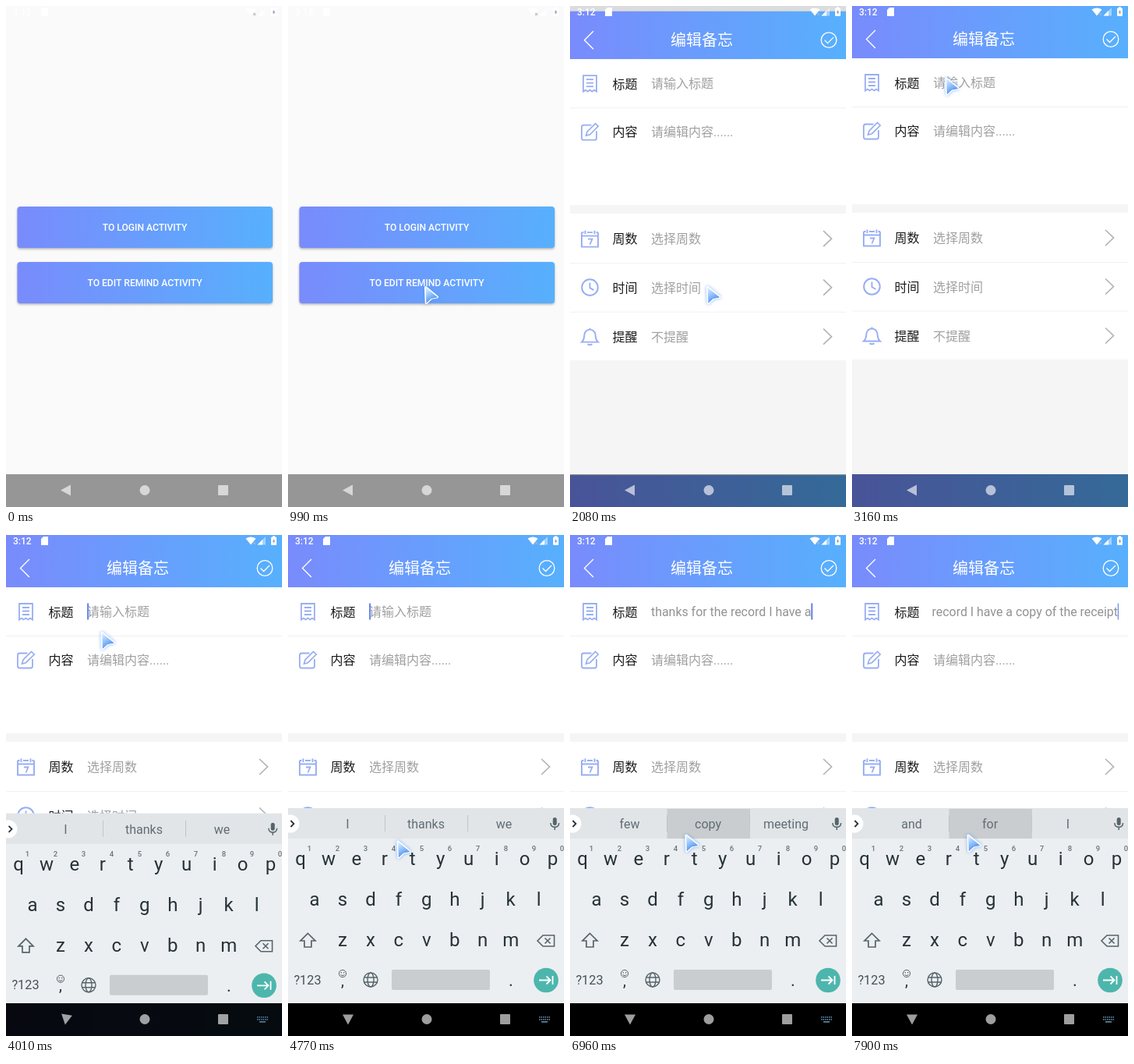
These frames come from a looping animation (354x642 px, 8000 ms). An HTML page with a canvas:

```html
<!DOCTYPE html>
<html lang="zh-CN">
<head>
<meta charset="utf-8">
<title>Edit memo</title>
<style>
html, body { margin: 0; width: 100%; height: 100%; overflow: hidden; background: #fafafa; }
canvas { display: block; width: 354px; height: 642px; }
</style>
</head>
<body>
<canvas id="stage"></canvas>
<script>
const W = 354, H = 642, LOOP = 8000, NAV = 600;
const FONT = "Roboto, 'Noto Sans CJK SC', 'Noto Sans CJK', sans-serif";
const cv = document.getElementById('stage');
const c = cv.getContext('2d');
const dpr = window.devicePixelRatio || 1;
cv.width = W * dpr;
cv.height = H * dpr;

// ---- helpers ----
const clamp = x => Math.max(0, Math.min(1, x));
const span = (t, a, b) => clamp((t - a) / (b - a));
const mix = (a, b, k) => a + (b - a) * k;

// y at x on a cubic through (x0,y0)..(x3,y3)
function cubic(x, x0, y0, x1, y1, x2, y2, x3, y3) {
  const at = (u, a, b, d, e) => {
    const v = 1 - u;
    return v * v * v * a + 3 * v * v * u * b + 3 * v * u * u * d + u * u * u * e;
  };
  let lo = 0, hi = 1;
  for (let i = 0; i < 24; i++) {
    const m = (lo + hi) / 2;
    if (at(m, x0, x1, x2, x3) < x) lo = m; else hi = m;
  }
  return at(lo, y0, y1, y2, y3);
}
const slowIn = x => cubic(x, 0, 0, .4, 0, .2, 1, 1, 1);
const extraSlowIn = x => x < 1 / 6
  ? cubic(x, 0, 0, .05, 0, .1333, .06, 1 / 6, .4)
  : cubic(x, 1 / 6, .4, .2083, .82, .25, 1, 1, 1);

function rect(x, y, w, h, fill) {
  c.fillStyle = fill;
  c.fillRect(x, y, w, h);
}
function round(x, y, w, h, r, fill) {
  c.beginPath();
  c.roundRect(x, y, w, h, r);
  c.fillStyle = fill;
  c.fill();
}
function disc(x, y, r, fill) {
  c.beginPath();
  c.arc(x, y, r, 0, 7);
  c.fillStyle = fill;
  c.fill();
}
function poly(pts, close) {
  c.beginPath();
  for (let i = 0; i < pts.length; i += 2) c.lineTo(pts[i], pts[i + 1]);
  if (close) c.closePath();
}
function fillPoly(pts, fill) {
  poly(pts, true);
  c.fillStyle = fill;
  c.fill();
}
function line(pts, color, w, close) {
  poly(pts, close);
  c.strokeStyle = color;
  c.lineWidth = w;
  c.stroke();
}
function path(d, color, w, x = 0, y = 0) {
  c.save();
  c.translate(x, y);
  c.strokeStyle = color;
  c.lineWidth = w;
  c.stroke(new Path2D(d));
  c.restore();
}
function text(s, x, y, size, color, align = 'left', weight = 400) {
  c.font = `${weight} ${size}px ${FONT}`;
  c.textAlign = align;
  c.fillStyle = color;
  c.fillText(s, x, y);
}
function blueFade(x0, x1) {
  const g = c.createLinearGradient(x0, 0, x1, 0);
  g.addColorStop(0, '#798bfc');
  g.addColorStop(1, '#57b0fd');
  return g;
}

// ---- system bars ----
function statusBar() {
  const w = '#fff';
  text('3:12', 9, 12, 12, w, 'left', 500);
  fillPoly([48, 2, 54, 2, 54, 13, 45, 13, 45, 5], w);
  c.beginPath();
  c.moveTo(314, 12.5);
  c.lineTo(307.5, 4.5);
  c.quadraticCurveTo(314, .5, 320.5, 4.5);
  c.closePath();
  c.fillStyle = w;
  c.fill();
  text('×', 316.5, 13, 8, '#a8b4c8', 'left', 700);
  c.globalAlpha = .45;
  fillPoly([333, 2, 333, 12.5, 322.5, 12.5], w);
  c.globalAlpha = 1;
  fillPoly([329, 6, 329, 12.5, 322.5, 12.5], w);
  round(340, 2.5, 7, 10.5, 1, w);
  rect(342, 1.3, 3, 2, w);
  fillPoly([344.2, 4.5, 341.6, 8.4, 343.3, 8.4, 342.8, 11.2, 345.4, 7.2, 343.7, 7.2], '#8b9bb8');
}

function navBar(kb) {
  rect(0, NAV, W, H - NAV, 'rgba(0,0,0,.4)');
  c.globalAlpha = kb;
  rect(0, NAV, W, H - NAV, '#000');
  c.globalAlpha = 1;
  const ink = 'rgba(255,255,255,.62)';
  c.save();
  c.translate(77, 620.5);
  c.rotate(-Math.PI / 2 * kb);
  fillPoly([-7, 0, 6, -7, 6, 7], ink);
  c.restore();
  disc(178, 620.5, 6.5, ink);
  round(272, 614, 13, 13, 1, ink);
  if (kb > 0) {
    c.globalAlpha = kb;
    for (let r = 0; r < 2; r++)
      for (let i = 0; i < 6; i++) rect(322 + i * 2.5, 617 + r * 3, 1.5, 1.7, '#5f87a0');
    rect(325, 623, 8, 1.7, '#5f87a0');
    c.globalAlpha = 1;
  }
}

// ---- first screen ----
function button(y, label, press) {
  c.save();
  c.shadowColor = 'rgba(0,0,0,.3)';
  c.shadowBlur = (3 + press * 3) * dpr;
  c.shadowOffsetY = (1.5 + press) * dpr;
  round(14.5, y, 327.5, 53, 4, blueFade(14, 342));
  c.restore();
  if (press > 0) {
    c.save();
    c.beginPath();
    c.roundRect(14.5, y, 327.5, 53, 4);
    c.clip();
    disc(177, y + 32, mix(20, 190, press), 'rgba(0,0,0,.05)');
    c.restore();
  }
  text(label, 178, y + 31.3, 12.1, '#fff', 'center', 500);
}
function home(t) {
  rect(0, 0, W, H, '#fafafa');
  button(257, 'TO LOGIN ACTIVITY', 0);
  button(328, 'TO EDIT REMIND ACTIVITY', span(t, 1280, 1480));
}

// ---- editor screen ----
const ICON = '#98aef3', HINT = '#a0a0a0';
const icons = {
  note(y) {
    path('M-8.5 10V-10.5H8.5V10L5.5 8L3 10L0 8L-3 10L-5.5 8ZM-4.5 -5.5H4.5M-4.5 -1H4.5M-4.5 3.5H4.5', ICON, 1.8, 25.5, y);
  },
  pen(y) {
    path('M2 -8.5H-8Q-10.5 -8.5 -10.5 -6V8Q-10.5 10.5 -8 10.5H6Q8.5 10.5 8.5 8V-1', ICON, 1.8, 25.5, y);
    path('M-5 5L-3.5 0L7 -10.5L10.7 -7L0 3.7Z', ICON, 1.7, 25.5, y);
  },
  calendar(y) {
    path('M-10.5 -8V10.5H10.5V-8M-10.5 -8H-8M-3.5 -8H3.5M8 -8H10.5M-10.5 -3.5H10.5M-6 -10.5V-6M6 -10.5V-6', ICON, 1.9, 25.5, y);
    path('M-2.5 .5H3L0 7.5', ICON, 1.8, 25.5, y);
  },
  clock(y) {
    c.beginPath();
    c.arc(25.5, y, 10.3, 0, 7);
    c.strokeStyle = ICON;
    c.lineWidth = 2;
    c.stroke();
    path('M0 -6V.5L5 3.5', ICON, 1.9, 25.5, y);
  },
  bell(y) {
    path('M-10.5 7H10.5C7 4 7.5 2 7 -3C6.5 -7 3 -9 0 -9C-3 -9 -6.5 -7 -7 -3C-7.5 2 -7 4 -10.5 7ZM0 -9V-11M-3 9.7Q0 11.7 3 9.7', ICON, 1.9, 25.5, y);
  }
};
function row(icon, y, label) {
  icons[icon](y);
  text(label, 54.5, y + 6, 16, '#1c1c1c');
}
function picker(icon, y, label, value) {
  row(icon, y, label);
  text(value, 104, y + 6, 16, HINT);
  line([325, y - 10, 335.5, y, 325, y + 10], '#b4b4b4', 1.7);
}

// time, word, then the three suggestions that follow it
const taps = [
  [0, '', 'I', 'thanks', 'we'],
  [5560, 'thanks', 'again', 'for', 'to'],
  [5790, 'for', 'your', 'the', 'being'],
  [6030, 'the', 'follow', 'record', 'info'],
  [6180, 'record', 'and', 'I', 'from'],
  [6410, 'I', 'was', 'have', 'will'],
  [6640, 'have', 'not', 'a', 'been'],
  [6960, 'a', 'few', 'copy', 'meeting'],
  [7190, 'copy', 'I', 'of', 'for'],
  [7420, 'of', 'a', 'the', 'my'],
  [7740, 'the', 'letter', 'receipt', 'new'],
  [7900, 'receipt', 'and', 'for', 'I']
];

function titleField(t) {
  const done = taps.filter(k => k[0] <= t);
  const typed = done.map(k => k[1]).join(' ').trim();
  const size = 15.92;
  c.font = `400 ${size}px ${FONT}`;
  const w = typed ? c.measureText(typed).width : 0;
  const shift = Math.max(0, w - 237);
  c.save();
  c.beginPath();
  c.rect(103, 80, 239, 40);
  c.clip();
  if (typed) text(typed, 104 - shift, 104, size, '#929292');
  else text('请输入标题', 104, 104, 16, HINT);
  const last = done[done.length - 1][0] || 3700;
  if (t >= 3700 && (t - last) % 1000 < 500) rect(104 + w - shift - (typed ? .2 : 0), 87.5, 2.2, 21, '#6a8bea');
  c.restore();
}

function editor(t) {
  rect(0, 0, W, H, blueFade(0, W));
  rect(0, 67, W, NAV - 67, '#f5f5f5');
  line([30, 31, 18.5, 42.5, 30, 54], '#fff', 1.4);
  text('编辑备忘', 169, 49.5, 20, '#fff', 'center');
  c.beginPath();
  c.arc(332, 42.5, 9.8, 0, 7);
  c.strokeStyle = '#fff';
  c.lineWidth = 1.3;
  c.stroke();
  line([326.5, 42.5, 330.5, 46.5, 338, 39], '#fff', 1.3);

  rect(0, 67, W, 187, '#fff');
  rect(0, 265, W, 188, '#fff');
  for (const y of [129, 328, 390.5]) rect(0, y, W, 1, '#f1f1f1');
  row('note', 98.5, '标题');
  titleField(t);
  row('pen', 160, '内容');
  text('请编辑内容......', 104, 165.5, 16, HINT);
  picker('calendar', 297, '周数', '选择周数');
  picker('clock', 359.5, '时间', '选择时间');
  picker('bell', 422.5, '提醒', '不提醒');
}

// ---- keyboard ----
const KEY = '#263238', SOFT = '#56646b';
function keyboard(t) {
  rect(0, 350, W, 292, '#eceff1');
  rect(0, 350, W, 39, '#e1e5e8');
  const lit = t >= 5400 && !(t >= 7420 && t < 7580);
  if (lit) rect(124.5, 351, 106.5, 38, '#c9cdcf');
  rect(124, 359, 1, 21, '#c0c5c8');
  rect(230, 359, 1, 21, '#c0c5c8');
  const now = taps.filter(k => k[0] <= t).pop();
  [76.5, 177, 277].forEach((x, i) => text(now[i + 2], x, 376, 16, '#616d73', 'center'));
  disc(3, 370, 11.5, '#fff');
  line([3.5, 366, 7.5, 370, 3.5, 374], KEY, 1.8);
  round(339.7, 362, 5, 10, 2.5, SOFT);
  path('M336.8 369Q337 374.3 342.2 374.3Q347.4 374.3 347.6 369M342.2 374V378', SOFT, 1.5);

  const keys = (s, x, y) => [...s].forEach((k, i) => text(k, x + i * 35.95, y, 24, KEY, 'center'));
  keys('qwertyuiop', 16, 423);
  keys('asdfghjkl', 34, 475);
  keys('zxcvbnm', 70, 527);
  [...'1234567890'].forEach((k, i) => text(k, 27.5 + i * 36, 405, 9.5, '#66737a', 'center', 500));

  path('M25.5 510.5L35 520H30V528H21V520H16Z', SOFT, 1.7);
  path('M327 513H341.5V527H327L320 520ZM329.5 516.5L336.5 523.5M336.5 516.5L329.5 523.5', SOFT, 1.6);

  text('?123', 25, 575.5, 16.3, '#455259', 'center');
  c.beginPath();
  c.arc(70, 562, 4.6, 0, 7);
  c.strokeStyle = SOFT;
  c.lineWidth = 1;
  c.stroke();
  path('M67.5 563.5Q70 566 72.5 563.5', SOFT, 1);
  disc(68.3, 560.8, .8, SOFT);
  disc(71.7, 560.8, .8, SOFT);
  text(',', 70, 577.5, 20, KEY, 'center');
  for (const r of [9, 4]) {
    c.beginPath();
    c.ellipse(106, 570, r, 9, 0, 0, 7);
    c.strokeStyle = SOFT;
    c.lineWidth = 1.4;
    c.stroke();
  }
  path('M98 567H114M98 573H114', SOFT, 1.4);
  round(133, 557, 126, 26, 2, '#c9cdcf');
  text('.', 286, 578, 22, KEY, 'center');
  disc(331, 570.5, 15.8, '#4db6ac');
  path('M322 570.5H336M331.5 565.5L336.5 570.5L331.5 575.5M339.5 565V576', '#fff', 1.8);
}

// ---- pointer ----
// start, end, then from and to
const moves = [
  [290, 850, 272, 636, 174.5, 357.5],
  [900, 990, 174.5, 357.5, 176.5, 359.5],
  [2330, 3160, 176.5, 359.5, 121, 92],
  [3850, 4640, 121, 92, 140.5, 394],
  [4660, 4770, 140.5, 394, 141, 392],
  [4940, 5190, 141, 392, 149, 384]
];
function pointer(t) {
  const m = moves.filter(k => k[0] <= t).pop();
  if (!m) return;
  const k = span(t, m[0], m[1]), e = k * k * (3 - 2 * k);
  c.save();
  c.translate(mix(m[2], m[4], e), mix(m[3], m[5], e));
  const arrow = [0, 1, 15, 13.5, 7, 15, .8, 21];
  c.lineJoin = 'round';
  c.shadowColor = 'rgba(70,140,240,.65)';
  c.shadowBlur = 4 * dpr;
  line(arrow, '#fff', 3.2, true);
  c.shadowColor = 'transparent';
  const g = c.createLinearGradient(0, 4, 9, 19);
  g.addColorStop(0, '#d5e8ff');
  g.addColorStop(.5, '#8fc0fb');
  g.addColorStop(1, '#4e8ff0');
  fillPoly(arrow, g);
  line([1, 20.5, 7, 15, 15, 13.5], '#5c98f2', 1);
  c.restore();
}

// ---- scene ----
function draw(t) {
  c.setTransform(dpr, 0, 0, dpr, 0, 0);
  c.lineJoin = 'miter';
  const p = span(t, 1765, 2190);
  if (p < 1) {
    const out = extraSlowIn(p);
    rect(0, 0, W, H, '#000');
    c.save();
    c.globalAlpha = 1 - .12 * out;
    c.translate(0, -.02 * H * slowIn(p));
    if (p > 0) rect(0, 0, W, H * 1.05, '#fafafa');
    else home(t);
    if (p > 0 && p < .2) button(257, 'TO LOGIN ACTIVITY', 0), button(328, 'TO EDIT REMIND ACTIVITY', 1);
    c.restore();
  }
  if (p > 0) {
    const top = .959 * H * (1 - extraSlowIn(p));
    c.save();
    c.translate(0, .041 * H * (1 - slowIn(p)));
    c.beginPath();
    c.rect(0, top, W, H);
    c.clip();
    editor(t);
    c.restore();
  }
  const kb = slowIn(span(t, 3830, 4120));
  if (kb > 0) {
    c.save();
    c.beginPath();
    c.rect(0, 0, W, NAV);
    c.clip();
    c.translate(0, 64 * (1 - kb));
    c.globalAlpha = kb;
    if (kb < 1) rect(0, 350, W, 292, '#eceff1');
    if (kb > .25) {
      c.globalAlpha = 1;
      keyboard(t);
    }
    c.restore();
  }
  navBar(kb);
  statusBar();
  pointer(t);
}

function frame() {
  draw(performance.now() % LOOP);
  requestAnimationFrame(frame);
}
frame();
</script>
</body>
</html>
```
